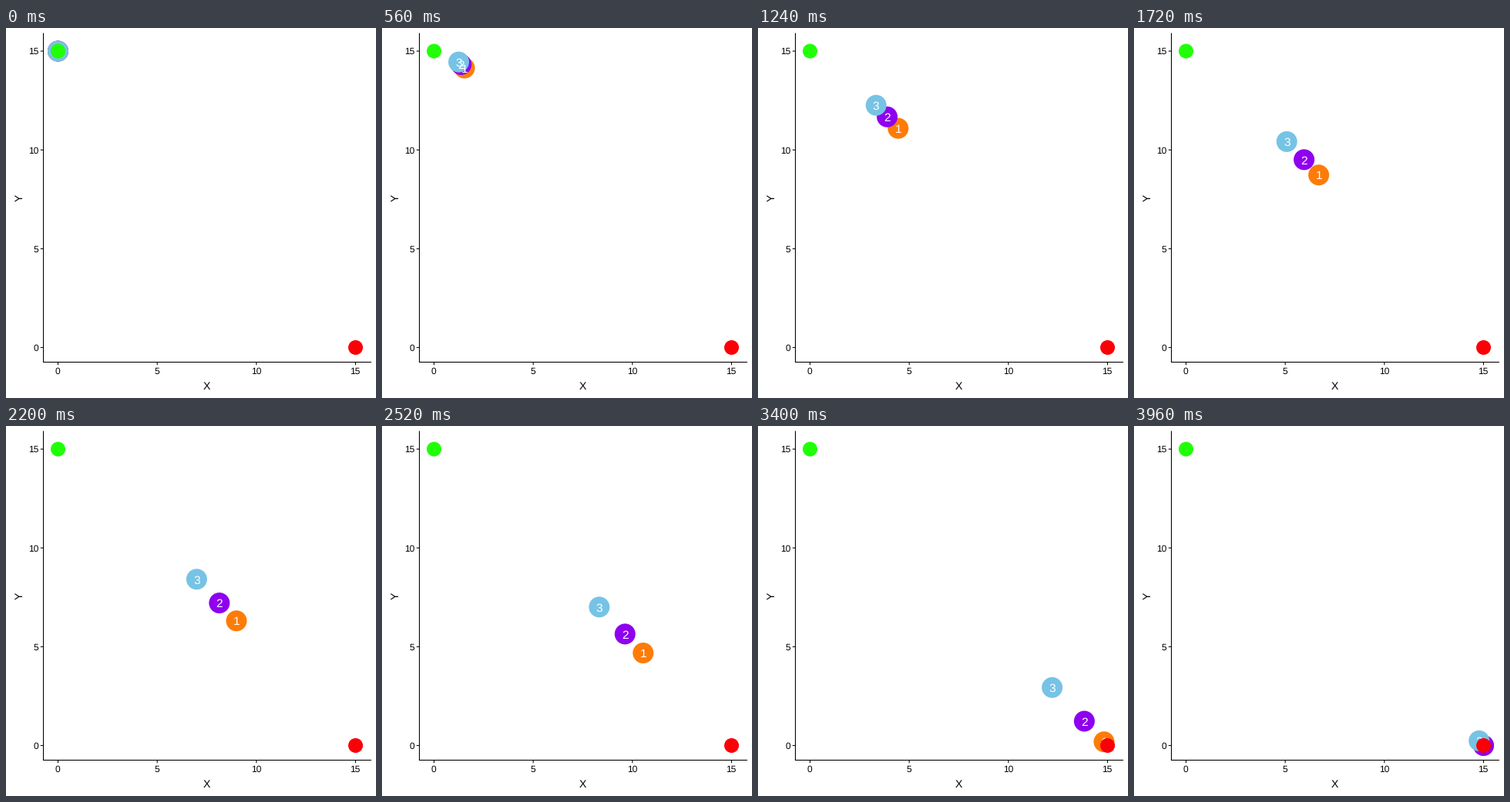
Recreate the animation shown at these times as a matplotlib script. Size 480x480 px, loop 4 s.

```python
import math
import matplotlib.pyplot as plt
from matplotlib.animation import FuncAnimation
from matplotlib.patches import Circle

SIZE, DPI, FRAMES, INTERVAL = 480, 80, 100, 40
GOAL = 15
SLOPE = 1.0505  # slope of the straight run towards the goal
KICK_END, KICK_X = 7, 0.57  # shared first move, then the racers part
TOP_SPEED = 0.195

# name, colour, distance lost while speeding up, time to speed up
RACERS = [
    ("1", "#FD7C08", 0.96, 13),
    ("2", "#8E00EE", 2.0, 21),
    ("3", "#77C3E5", 4.1, 38),
]

plt.rcParams["font.family"] = "Liberation Sans"
plt.rcParams["text.hinting"] = "no_hinting"
fig = plt.figure(figsize=(SIZE / DPI, SIZE / DPI), dpi=DPI, facecolor="white")
ax = fig.add_axes([0, 0, 1, 1])
ax.set_xlim(0, SIZE)
ax.set_ylim(SIZE, 0)
ax.axis("off")


def px(x):
    return 67.5 + x * 386 / 15


def py(y):
    return 414.5 - y * 384.5 / 15


def line(xs, ys):
    ax.plot(xs, ys, color="black", lw=1.07 * 72 / DPI,
            solid_capstyle="butt", snap=False)


def text(x, y, s, size, **kw):
    kw = {"ha": "center", "va": "baseline", "color": "black", **kw}
    return ax.text(x, y, s, fontsize=size * 72 / DPI, **kw)


def dot(x, y, r, color, z):
    return ax.add_patch(Circle((x, y), r, fc=color, ec="none", zorder=z))


def position(frame, lag, tau):
    if frame < KICK_END:
        k = frame / KICK_END
        rise = SLOPE * (GOAL - KICK_X) - GOAL
        return px(KICK_X * k), py(GOAL + rise * k)
    t = frame - KICK_END
    x = KICK_X + TOP_SPEED * t - lag * (1 - math.exp(-t / tau))
    x = min(x, GOAL)
    return px(x), py(SLOPE * (GOAL - x))


# Axes
line([48.5, 48.5], [6.5, 434])
line([48, 474], [433.5, 433.5])
for v in (0, 5, 10, 15):
    line([44.8, 48.5], [py(v), py(v)])
    line([px(v), px(v)], [433.5, 437.2])
    text(42, py(v) + 4.3, str(v), 12, ha="right")
    text(px(v) - 0.5, 449, str(v), 12)
text(260.5, 469, "X", 14)
text(22, 220, "Y", 14, rotation=90, rotation_mode="anchor")

# Racers, their numbers, then start and goal on top
start = px(0), py(GOAL)
discs = [dot(*start, 13.5, color, 3) for _, color, _, _ in RACERS]
labels = [text(*start, name, 15.5, color="white", zorder=4)
          for name, _, _, _ in RACERS]
dot(*start, 9.5, "#21FF06", 5)
dot(px(GOAL), py(0), 9.5, "#FB0007", 5)


def update(frame):
    for disc, label, (_, _, lag, tau) in zip(discs, labels, RACERS):
        x, y = position(frame, lag, tau)
        disc.center = x, y
        label.set_position((x, y + 5.7))
    return discs + labels


anim = FuncAnimation(fig, update, frames=FRAMES, interval=INTERVAL,
                     init_func=lambda: update(0), repeat=True, repeat_delay=0)
plt.show()
```
